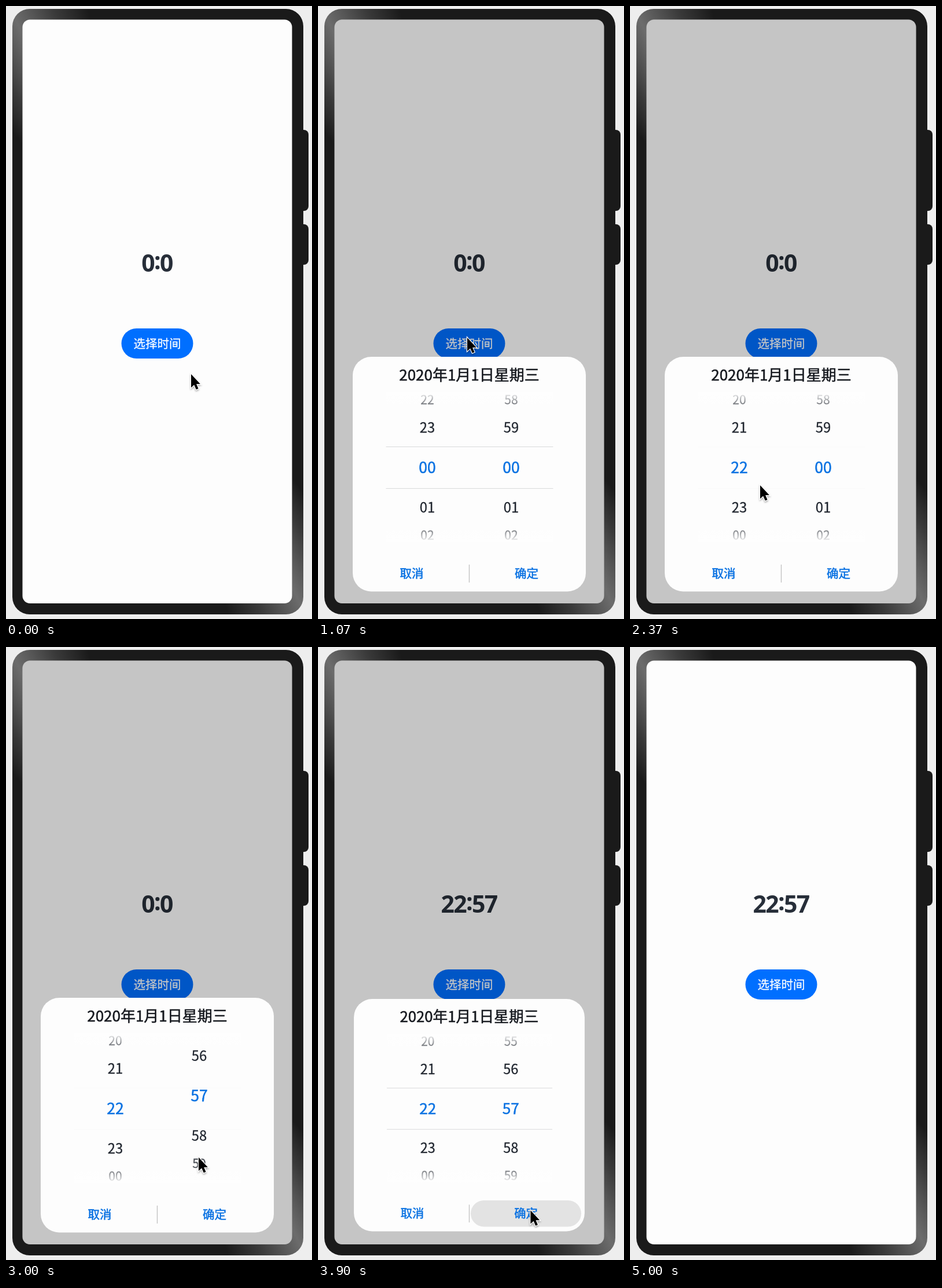
Recreate the animation shown at these times as an HTML page. Size 529x1059 px, loop 5.31 s.

```html
<!DOCTYPE html>
<html lang="zh-CN">
<head>
<meta charset="utf-8">
<title>Time picker</title>
<style>
  html, body { margin: 0; width: 100%; height: 100%; overflow: hidden; background: #eee; }
  div, svg { position: absolute; }
  .key { left: 513px; width: 10px; background: #1a1a1a; border-radius: 0 8px 8px 0; }
  .body {
    left: 10.5px; top: 5px; width: 503px; height: 1046px; border-radius: 30px;
    background: repeating-conic-gradient(from -39deg, #1a1a1a 0deg, #3a3a3a 6deg, #6c6c6c 13deg,
      #3a3a3a 20deg, #1a1a1a 26deg 180deg);
  }
  svg { left: 0; top: 0; }
  text {
    font-family: "Noto Sans CJK SC", "Noto Sans CJK", "Noto Sans", sans-serif; font-weight: 500;
    text-anchor: middle; fill: var(--ink); stroke: var(--ink); stroke-width: .55;
  }
  #clock { font: 700 41px "Noto Sans", "Open Sans", sans-serif; letter-spacing: -1.7px; --ink: #272e39; stroke: none; }
  .label { font-size: 20.5px; }
  .blue, .row0 { --ink: #0a72e2; }
  .row1 { --ink: #20262f; }
  .row2 { --ink: #4a4e55; }
  .row1, .row2 { font-weight: 400; stroke-width: .3; }
</style>
</head>
<body>
<div class="key" style="top:214px;height:140px"></div>
<div class="key" style="top:377px;height:70px"></div>
<div class="body"></div>
<svg width="529" height="1059" viewBox="0 0 529 1059">
  <defs>
    <linearGradient id="fade" x2="0" y2="1">
      <stop stop-color="#fefefe"/><stop offset="1" stop-color="#fefefe" stop-opacity="0"/>
    </linearGradient>
    <clipPath id="window"><path d="M110 667H414V926H110Z"/></clipPath>
    <filter id="shadow" x="-50%" y="-50%" width="200%" height="200%">
      <feDropShadow dx="0" dy="2" stdDeviation="1.5" flood-opacity=".35"/>
    </filter>
  </defs>
  <rect x="28.5" y="23.5" width="466" height="1008.5" rx="13" fill="#fdfdfd"/>
  <text id="clock" x="261" y="458.5"></text>
  <rect x="199.5" y="557" width="124" height="52" rx="26" fill="#006fff"/>
  <rect id="press" x="199.5" y="557" width="124" height="52" rx="26" opacity=".08"/>
  <text class="label" x="261.5" y="590.5" style="--ink:#fff;stroke-width:.3">选择时间</text>
  <rect id="dim" x="28.5" y="23.5" width="466" height="1008.5" rx="13"/>
  <g id="dialog">
    <rect x="60" y="606" width="403" height="405.5" rx="32" fill="#fdfdfd"/>
    <text x="261.5" y="646.5" font-size="26" style="--ink:#16191f">2020年1月1日星期三</text>
    <g clip-path="url(#window)"><g id="hours"></g><g id="minutes"></g></g>
    <rect x="118" y="667" width="288" height="28" fill="url(#fade)"/>
    <rect x="118" y="667" width="288" height="28" fill="url(#fade)" transform="matrix(1 0 0 -1 0 1593)"/>
    <path id="lines" d="M117.5 761.5H406.5M117.5 833.5H406.5" stroke="#d9dadb" stroke-width="1.2"/>
    <path d="M261.5 965V996" stroke="#c4c4c4" stroke-width="1.4"/>
    <rect id="pill" x="264" y="957.5" width="193" height="46" rx="23" fill="#e3e3e3"/>
    <text class="label blue" x="162" y="987.5">取消</text>
    <text class="label blue" x="360.5" y="987.5">确定</text>
  </g>
  <path id="cursor" d="M0 0V24.5L5.5 19.5L9.2 28L13.2 26.3L9.6 18H16.7Z" stroke="#fff"
    stroke-width="2.4" paint-order="stroke" filter="url(#shadow)"/>
</svg>
<script>
const $ = id => document.getElementById(id);
const LOOP = 5310, CONFIRM = 3870, ROW = 69;

const progress = (t, from, to) => Math.min(1, Math.max(0, (t - from) / (to - from)));
const ease = (t, from, to) => {
  const u = progress(t, from, to);
  return u * u * (3 - 2 * u);
};
const set = (id, name, value) => $(id).setAttribute(name, value);
const show = (id, on) => $(id).style.display = on ? '' : 'none';

// A column of five values around the selected one; outer rows sit closer
function wheel(id, x, count) {
  const rows = [];
  for (let d = -2; d <= 2; d++) {
    const far = Math.abs(d), size = 26.5 - 2.7 * far;
    const y = 797 + d * (far < 2 ? ROW : 58.5) + size * .37;
    $(id).insertAdjacentHTML('beforeend', `<text class="row${far}" x="${x}" y="${y}" font-size="${size}"></text>`);
    rows.push([d, $(id).lastChild]);
  }
  return pos => {
    const value = Math.round(pos);
    set(id, 'transform', `translate(0 ${(value - pos) * ROW})`);
    for (const [d, el] of rows) el.textContent = String((value + d + count) % count).padStart(2, '0');
  };
}

const setHours = wheel('hours', 189, 24), setMinutes = wheel('minutes', 334, 60);

function drawCursor(t, hourDrag, minuteDrag) {
  let x = 320, y = 636;
  const go = (k, toX, toY) => { x += (toX - x) * k; y += (toY - y) * k; };
  go(ease(t, 30, 530), 258, 573);
  go(ease(t, 1130, 1400), 173, 753);
  y += hourDrag * ROW;
  go(ease(t, 2230, 2600), 333, 697);
  y += minuteDrag * ROW;
  go(ease(t, 3400, 3750), 368, 976);
  go(progress(t, 3792, 4570) ** 3, 157, -40);
  set('cursor', 'transform', `translate(${x} ${y}) scale(.95)`);
}

function drawDialog(t) {
  const shown = ease(t, 820, 970) - ease(t, 3900, 4090);
  const grown = 1 - (1 - progress(t, 820, 1024)) ** 3 - ease(t, CONFIRM, 4065);
  set('dim', 'opacity', .222 * shown ** 1.2);
  set('dialog', 'opacity', shown);
  set('dialog', 'transform', `translate(261.5 808.5) scale(${.85 + .15 * grown}) translate(-261.5 -808.5)`);
  set('lines', 'opacity', t > 1100 && t < CONFIRM ? .08 : 1);
  show('pill', t >= CONFIRM && t < 3990);
}

function draw(t) {
  const [h, m] = t < CONFIRM ? [0, 0] : [22, 57];
  $('clock').innerHTML = `${h}<tspan dy="-4">:</tspan><tspan dy="4">${m}</tspan>`;
  show('press', t > 720 && t < 900);
  const hourDrag = 2 * ease(t, 1466, 1966), minuteDrag = 3 * ease(t, 2700, 3078);
  setHours(-hourDrag);
  setMinutes(-minuteDrag);
  drawDialog(t);
  drawCursor(t, hourDrag, minuteDrag);
}

const start = performance.now();
function tick() {
  draw((performance.now() - start) % LOOP);
  requestAnimationFrame(tick);
}
tick();
</script>
</body>
</html>
```
